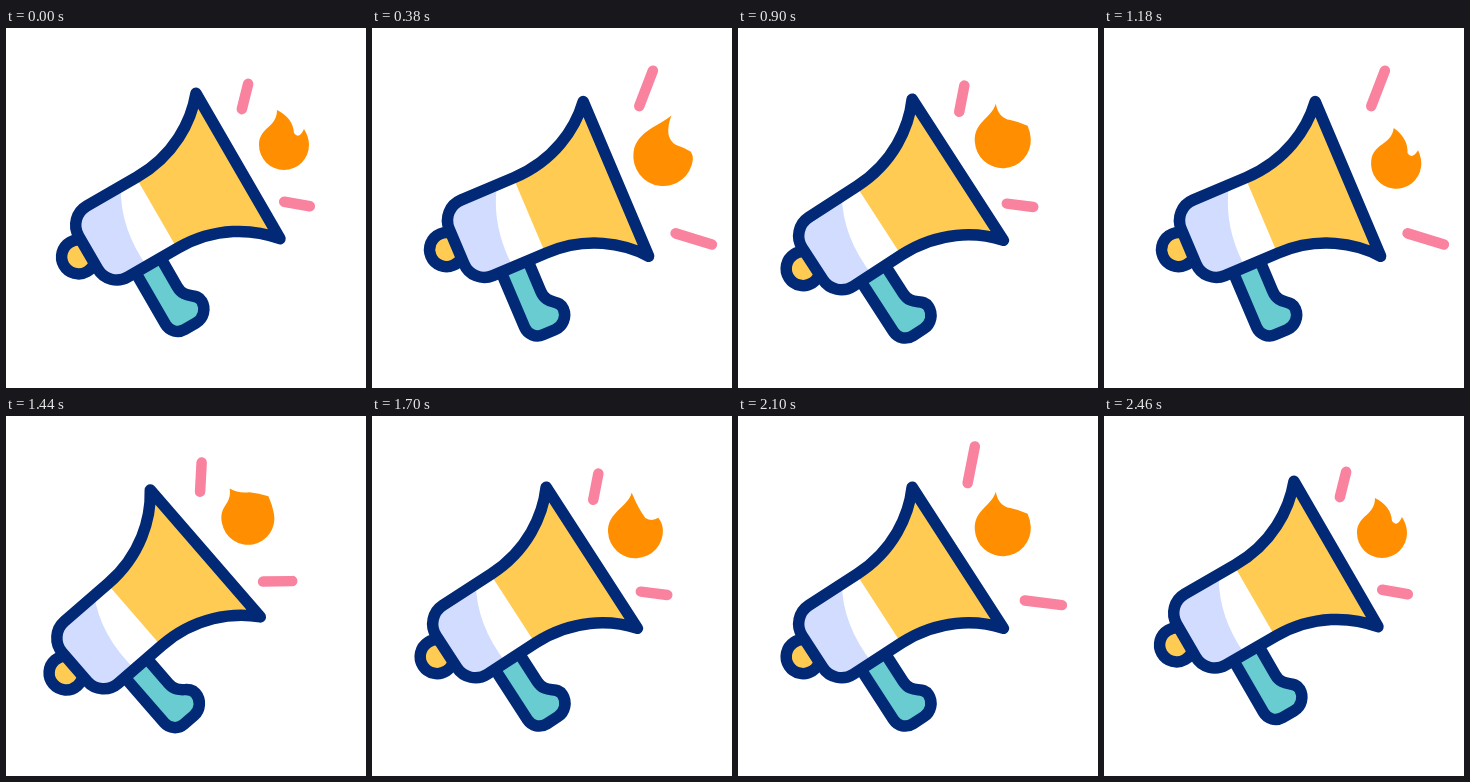
Write an HTML page that moves like this. It is 360 px wide and 360 px high and loops after 2820 ms.

```html
<!DOCTYPE html>
<html lang="en">
<head>
<meta charset="utf-8">
<title>Megaphone</title>
<style>
  html, body { margin: 0; width: 100%; height: 100%; overflow: hidden; background: #fff; }
  svg { display: block; width: 100%; height: 100%; }
  .ink { stroke: #012975; stroke-width: 11.5; stroke-linejoin: round; }
  .ray { stroke: #f9829f; stroke-width: 10.5; stroke-linecap: round; }
</style>
</head>
<body>
<svg viewBox="0 0 360 360">
  <defs>
    <path id="body" d="M0 -84 C-18 -62 -50 -41 -93 -41 H-151 A22 22 0 0 0 -173 -19 V19 A22 22 0 0 0 -151 41 H-93 C-50 41 -18 62 0 84 Z"/>
    <clipPath id="inside"><use href="#body"/></clipPath>
  </defs>
  <g id="all">
    <g transform="translate(232 138) rotate(-30)">
      <circle class="ink" cx="-183.5" cy="-1" r="17" fill="#ffcb52"/>
      <path class="ink" fill="#68ccd0" d="M-142 34 V101 A14 14 0 0 0 -128 115 H-115 A16 16 0 0 0 -99 99 C-99 88 -113 90 -113 74 V34 Z"/>
      <g clip-path="url(#inside)">
        <rect x="-180" y="-90" width="190" height="180" fill="#fff"/>
        <path fill="#d1dcff" d="M-180 -42 H-111 C-126 -18 -132 10 -129 42 H-180 Z"/>
        <rect x="-94" y="-90" width="100" height="180" fill="#ffcb52"/>
      </g>
      <use href="#body" class="ink" fill="none"/>
    </g>
    <path id="flame" fill="#ff8f00"/>
    <line class="ray"/>
    <line class="ray"/>
  </g>
</svg>
<script>
const LOOP = 2820, SWING = 200, LAST = 2200, STOP = 2460, LIVE = 2400;
const HIGH = 7.5, LOW = -13;
const all = document.getElementById('all');
const flame = document.getElementById('flame');
const lines = document.querySelectorAll('.ray');

const mix = (a, b, k) => a + (b - a) * k;
const sine = k => (1 - Math.cos(Math.PI * k)) / 2;

// Flame poses: a round belly plus the points that shape its top
const calm = { cx: 278, cy: 117, r: 25, tipX: 271, tipY: 82, bendX: 287, bendY: 90,
  notchX: 288, notchY: 105, hornX: 298, hornY: 101, dip: 9, lean: 0 };
const full = { cx: 281, cy: 112, r: 26, tipX: 267, tipY: 80, bendX: 276, bendY: 85,
  notchX: 287, notchY: 85, hornX: 305, hornY: 93, dip: -1, lean: 0 };
const tall = { cx: 276, cy: 109.5, r: 30, tipX: 279.5, tipY: 68, bendX: 274, bendY: 91,
  notchX: 287, notchY: 97, hornX: 303, hornY: 102, dip: -1, lean: 10 };
const cycle = [calm, full, tall, calm];

// Rays: middle, outward travel and direction
const rays = [
  { x: 239, y: 68.5, dx: 11.8, dy: -24, turn: 104 },
  { x: 291, y: 176, dx: 25.6, dy: 12, turn: 10 }
];

// Angle, and how far the drawing has left its rest place
function pose(t) {
  if (t >= SWING && t < LAST) return [mix(HIGH, LOW, sine(t / SWING)), 1];
  const k = t < SWING ? sine(t / SWING) : sine(Math.max(0, (STOP - t) / (STOP - LAST)));
  return [LOW * k, k];
}

function flamePath(t) {
  const step = (t % (3 * SWING)) / SWING, i = Math.floor(step), k = sine(step - i);
  const f = {};
  for (const key in calm) f[key] = mix(cycle[i][key], cycle[i + 1][key], k);
  const left = f.cx - f.r, right = f.cx + f.r;
  return `M${f.tipX} ${f.tipY}
    Q${f.bendX} ${f.bendY} ${f.notchX} ${f.notchY}
    Q${(f.notchX + f.hornX) / 2} ${(f.notchY + f.hornY) / 2 + f.dip} ${f.hornX} ${f.hornY}
    Q${right} ${(f.hornY + f.cy) / 2} ${right} ${f.cy}
    A${f.r} ${f.r} 0 0 1 ${left} ${f.cy}
    C${left} ${f.cy - 0.72 * f.r} ${f.tipX - f.lean} ${f.tipY + 18 - 0.7 * f.lean} ${f.tipX} ${f.tipY}Z`;
}

function draw(t) {
  const [angle, away] = pose(t);
  all.setAttribute('transform',
    `rotate(${angle} 179 285) translate(${-5 * away} ${6 * away})`);

  const live = Math.min(t, LIVE);
  flame.setAttribute('d', flamePath(live));

  const out = sine(sine(live / 400));
  const half = mix(13, 19, out);
  rays.forEach((r, i) => {
    lines[i].setAttribute('x1', -half);
    lines[i].setAttribute('x2', half);
    lines[i].setAttribute('transform',
      `translate(${r.x + r.dx * out} ${r.y + r.dy * out}) rotate(${r.turn})`);
  });
}

function tick(now) {
  draw(now % LOOP);
  requestAnimationFrame(tick);
}
draw(0);
requestAnimationFrame(tick);
</script>
</body>
</html>
```
